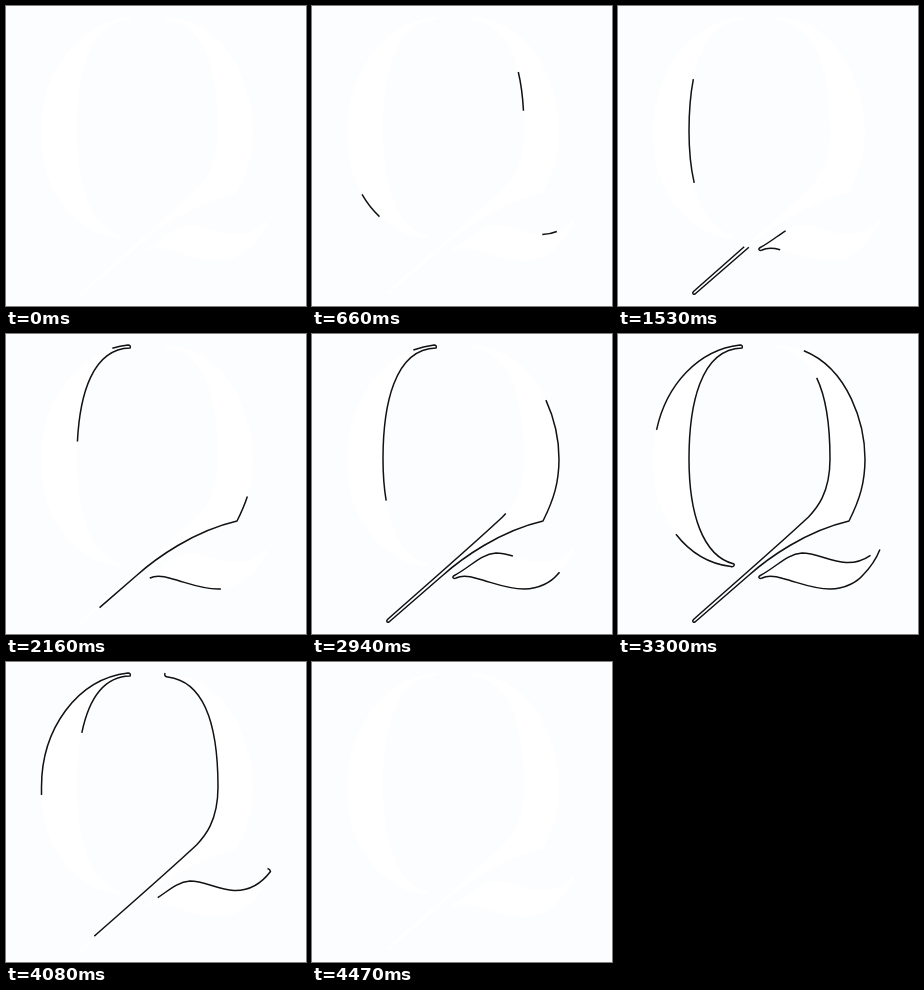
Animation of 300x300 px, one loop 4.5 s. Source, as an HTML page:

```html
<!DOCTYPE html>
<html lang="en">
<head>
<meta charset="utf-8">
<style>
  html, body { margin: 0; width: 100%; height: 100%; overflow: hidden; background: #fcfdff; }
  svg { display: block; width: 100%; height: 100%; }
  path { fill: #fff; stroke: #111; stroke-width: 1.5; stroke-linejoin: round; }
</style>
</head>
<body>
<svg viewBox="0 0 300 300">
  <path id="bowl" pathLength="1" d="M35.5 133C35.5 183 68 227 113 232.5C115 233.5 117 231 116 230C84 222 71 178 71 125C71 72 82 15 124 14C125 12.5 124 11 122 11C71 17 35.5 67 35.5 125Z"/>
  <path id="stem" pathLength="1" d="M159 11C158 14 160 15 162 15C200 20 212 66 212 125C212 160 198 175 190.5 183C160 211.5 103 261 75.5 285.5C74 287 75 289 77 288L130 242C150 224 188 197 231 187C242 165 247 148 247 125C247 85 225 15 160 11Z"/>
  <path id="leaf" pathLength="1" d="M261.5 206.5Q264 207 264.5 209.5C255 222 243 229 228 228.5C211 227 198 219 184 219C168 220.5 160 232 141.5 242C139.5 244 142.5 245 144 244C150 241 157 242 165 244.5C182 249 195 255 212 255C228 255 240 247 245 241C255 231 262 218 264 209Z"/>
</svg>
<script>
const LOOP = 4500;
const [bowl, stem, leaf] = ['bowl', 'stem', 'leaf'].map(id => document.getElementById(id));

const progress = (t, from, to) => Math.min(1, Math.max(0, (t - from) / (to - from)));
const smooth = p => p * p * (3 - 2 * p);
const ease = (t, from, to) => smooth(progress(t, from, to));

// Show only the part of the outline between two fractions of its length.
function trim(path, start, end) {
  const length = end - start;
  path.style.strokeOpacity = length > 0.001 ? 1 : 0;
  path.style.strokeDasharray = `0 ${start} ${Math.max(length, 0)} 2`;
}

function draw(t) {
  const travel = ease(t, 0, 2280);
  const spread = ease(t, 2280, 3620);
  const out = progress(t, 3620, 4460);
  const erase = (out + smooth(out)) / 2;

  const start = 0.5 * travel * (1 - spread);
  const end = (0.75 * travel + 0.25 * spread) * (1 - erase);
  trim(stem, start, end);
  trim(leaf, start, end);

  // The bowl opens later and is erased in the opposite direction.
  const bowlStart = 0.5 * travel * (1 - ease(t, 2650, 3620)) + erase;
  const bowlEnd = 0.745 * travel + 0.255 * ease(t, 2900, 3500);
  trim(bowl, bowlStart, bowlEnd);
}

function tick() {
  draw(performance.now() % LOOP);
  requestAnimationFrame(tick);
}
tick();
</script>
</body>
</html>
```
